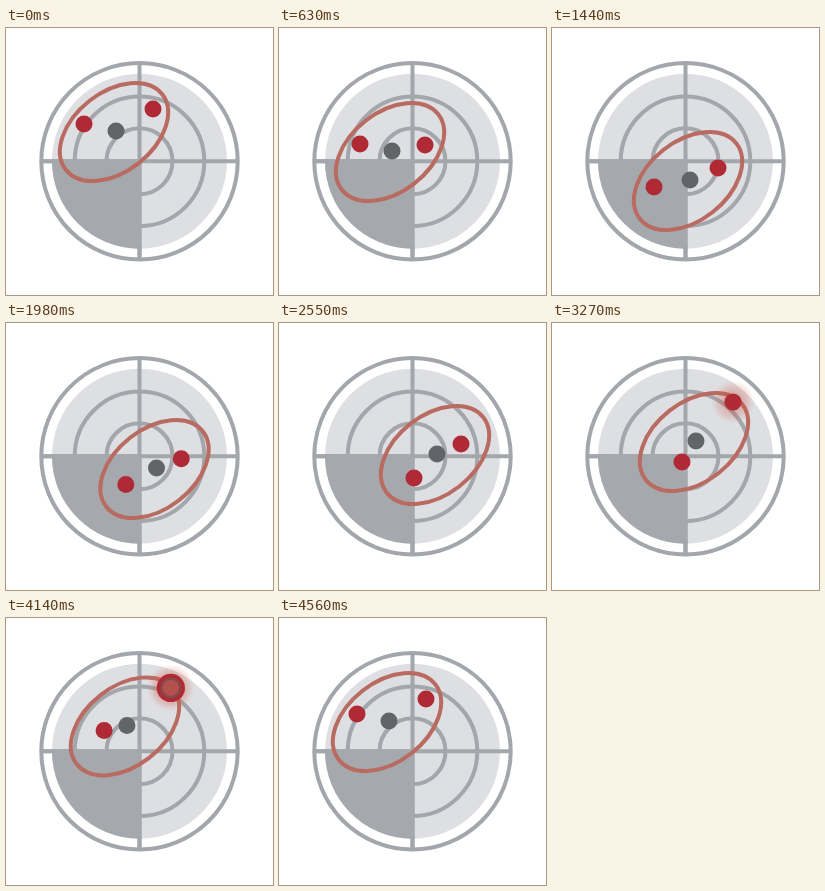
Recreate the animation shown at these times as an HTML page. Size 267 by 267 pixels, loop 4.76 s.

```html
<!DOCTYPE html>
<html lang="en">
<head>
<meta charset="utf-8">
<title>Radar</title>
<style>
  html, body { margin: 0; width: 100%; height: 100%; overflow: hidden; background: #fff; }
  svg { display: block; width: 100%; height: 100%; }
  .lines { fill: none; stroke: #a3a6ab; stroke-width: 4; }
</style>
</head>
<body>
<svg viewBox="0 0 267 267">
  <defs>
    <radialGradient id="glow">
      <stop offset="0.3" stop-color="#c8402f" stop-opacity="0.8"/>
      <stop offset="0.72" stop-color="#d0604c" stop-opacity="0.42"/>
      <stop offset="1" stop-color="#dc8a78" stop-opacity="0"/>
    </radialGradient>
  </defs>
  <circle cx="133.5" cy="133.2" r="87.5" fill="#dedfe3"/>
  <g class="lines">
    <circle cx="133.5" cy="133.3" r="98.2"/>
    <path d="M68.7 133.3A64.8 64.8 0 1 1 133.5 198.1"/>
    <path d="M100.5 133.3A33 33 0 1 1 133.5 166.3"/>
    <path d="M35 133.3H232M133.5 35V232"/>
  </g>
  <path d="M46 131.3H135.5V220.7H133.5A87.5 87.5 0 0 1 46 133.2Z" fill="#a5a8ac"/>
  <path class="lines" d="M133.5 218V232M35 133.3H50"/>
  <ellipse id="orbit" rx="61.2" ry="39.7" fill="none" stroke="#b96b61" stroke-width="4"/>
  <circle id="hub" r="8.5" fill="#636467"/>
  <circle id="left" r="8.5" fill="#af2a34"/>
  <g id="right">
    <circle id="halo" r="24" fill="url(#glow)"/>
    <circle id="core" r="8.5" fill="#af2a34"/>
    <circle id="lens" r="9.2" fill="#b96b61" stroke="#6b5f60" stroke-width="2.4"/>
  </g>
</svg>
<script>
const LOOP = 4760, END = 4560;
const times = [0, 630, 1440, 2550, 3270, 3720, END];
const paths = {
  hub: [[110, 103], [113, 123], [138, 152], [158, 131], [144, 118], [132, 112], [110, 103]],
  left: [[78, 96], [81, 116], [102, 159], [135, 155], [130, 139], [117, 128], [78, 96]],
  right: [[147, 81], [146, 117], [166, 140], [182, 121], [181, 79], [180, 63], [147, 81]]
};
const el = id => document.getElementById(id);
const clamp = v => Math.max(0, Math.min(1, v));
const ramp = (t, from, to) => {
  const u = clamp((t - from) / (to - from));
  return u * u * (3 - 2 * u);
};

function slope(pts, i, axis) {
  const a = Math.max(0, i - 1), b = Math.min(times.length - 1, i + 1);
  return (pts[b][axis] - pts[a][axis]) / (times[b] - times[a]);
}

// Cubic Hermite curve through the waypoints
function along(pts, t) {
  let i = 0;
  while (i < times.length - 2 && t >= times[i + 1]) i++;
  const span = times[i + 1] - times[i], u = clamp((t - times[i]) / span);
  const u2 = u * u, u3 = u2 * u;
  return [0, 1].map(k =>
    (2 * u3 - 3 * u2 + 1) * pts[i][k] + (3 * u2 - 2 * u3) * pts[i + 1][k] +
    span * ((u3 - 2 * u2 + u) * slope(pts, i, k) + (u3 - u2) * slope(pts, i + 1, k)));
}

const place = (id, [x, y], turn = 0) =>
  el(id).setAttribute("transform", `translate(${x} ${y}) rotate(${turn})`);

function draw(time) {
  const t = Math.min(time, END);
  for (const id in paths) place(id, along(paths[id], t));
  const [x, y] = along(paths.hub, t);
  place("orbit", [x - 2, y + 1], -38);

  const fade = 1 - ramp(t, 3900, 4450);
  const grow = ramp(t, 3250, 3700) * fade;
  el("halo").setAttribute("opacity", (0.45 * ramp(t, 3000, 3270) + 0.55 * ramp(t, 3270, 3700)) * fade);
  el("halo").setAttribute("r", 22 + 3 * grow);
  el("core").setAttribute("r", 8.5 + 9.5 * grow);
  el("lens").setAttribute("opacity", grow);
}

function tick() {
  draw(performance.now() % LOOP);
  requestAnimationFrame(tick);
}
tick();
</script>
</body>
</html>
```
